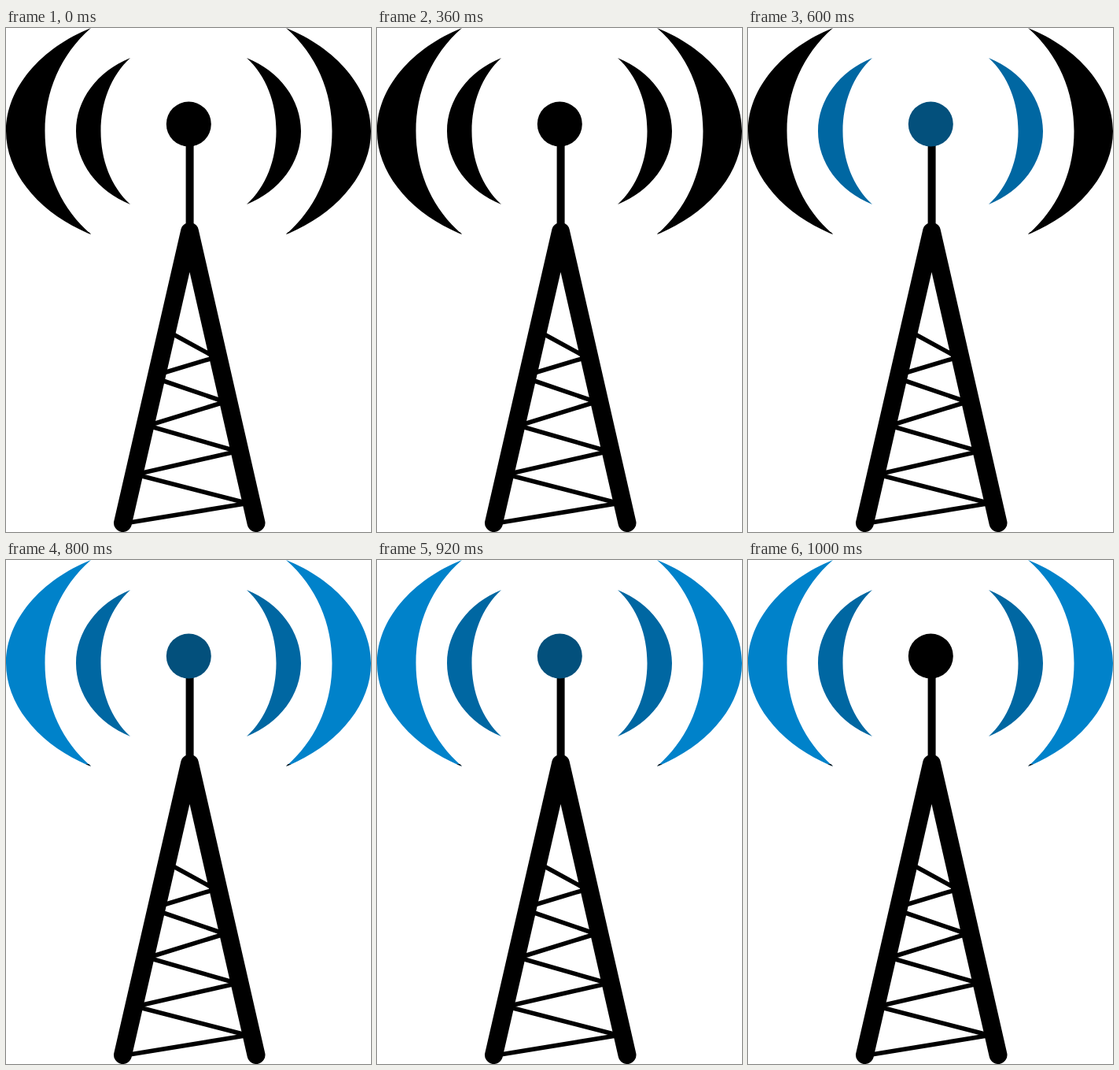
Write an HTML page that moves like this. It is 464 px wide and 640 px high and loops after 1200 ms.

```html
<!DOCTYPE html>
<html lang="en">
<head>
<meta charset="utf-8">
<title>Radio tower</title>
<style>
  html, body { margin: 0; width: 100%; height: 100%; overflow: hidden; background: #fff; }
  svg { display: block; width: 464px; height: 640px; }
  .legs, .struts { fill: none; stroke: #000; }
  .legs { stroke-width: 23; stroke-linecap: round; stroke-linejoin: round; }
  .struts { stroke-width: 5.6; }
</style>
</head>
<body>
<svg viewBox="0 0 464 640">
  <defs>
    <g id="waves">
      <path class="outer" d="M108 0C45 25 0 76 0 131S45 237 108 262C69 228 49.500 181 49.500 131S69 34 108 0Z"/>
      <path d="M108 262L101 259.300L105.500 259.300Z"/>
      <path class="inner" d="M158 38C116 55 89 91 89 131S116 207 158 224C133 201 120.500 167 120.500 131S133 61 158 38Z"/>
    </g>
  </defs>
  <g id="left"></g>
  <g id="right" transform="translate(464) scale(-1 1)"></g>
  <path d="M228.600 145H238.600V255H228.600Z"/>
  <circle class="ball" cx="232.300" cy="122" r="28.500"/>
  <path class="legs" d="M148.500 628.500L233.500 258.500L318 628.500"/>
  <path class="struts" d="M210 387.500L265 417.500M265 418.500L200 438M197 447L276 474M276 475.500L185 503.500M184 506L292 537M292 538L171 565.500M169 568L307 603.500M307 603.500L157 628"/>
</svg>
<script>
  const LOOP = 1200;
  const BLACK = '#000';

  // [selector, colour, time on, time off]
  const lights = [
    ['.inner', '#0067a2', 600, LOOP],
    ['.outer', '#0082ca', 800, LOOP],
    ['.ball', '#03507c', 600, 1000],
  ];

  const waves = document.getElementById('waves');
  for (const side of ['left', 'right'])
    document.getElementById(side).append(...waves.cloneNode(true).children);
  waves.remove();

  for (const [selector, colour, on, off] of lights) {
    const steps = [[0, BLACK], [on, colour]];
    if (off < LOOP) steps.push([off, BLACK]);
    steps.push([LOOP, steps[steps.length - 1][1]]);
    const frames = steps.map(([time, fill]) => ({ offset: time / LOOP, fill, easing: 'step-end' }));
    for (const part of document.querySelectorAll(selector))
      part.animate(frames, { duration: LOOP, iterations: Infinity }).startTime = 0;
  }
</script>
</body>
</html>
```
